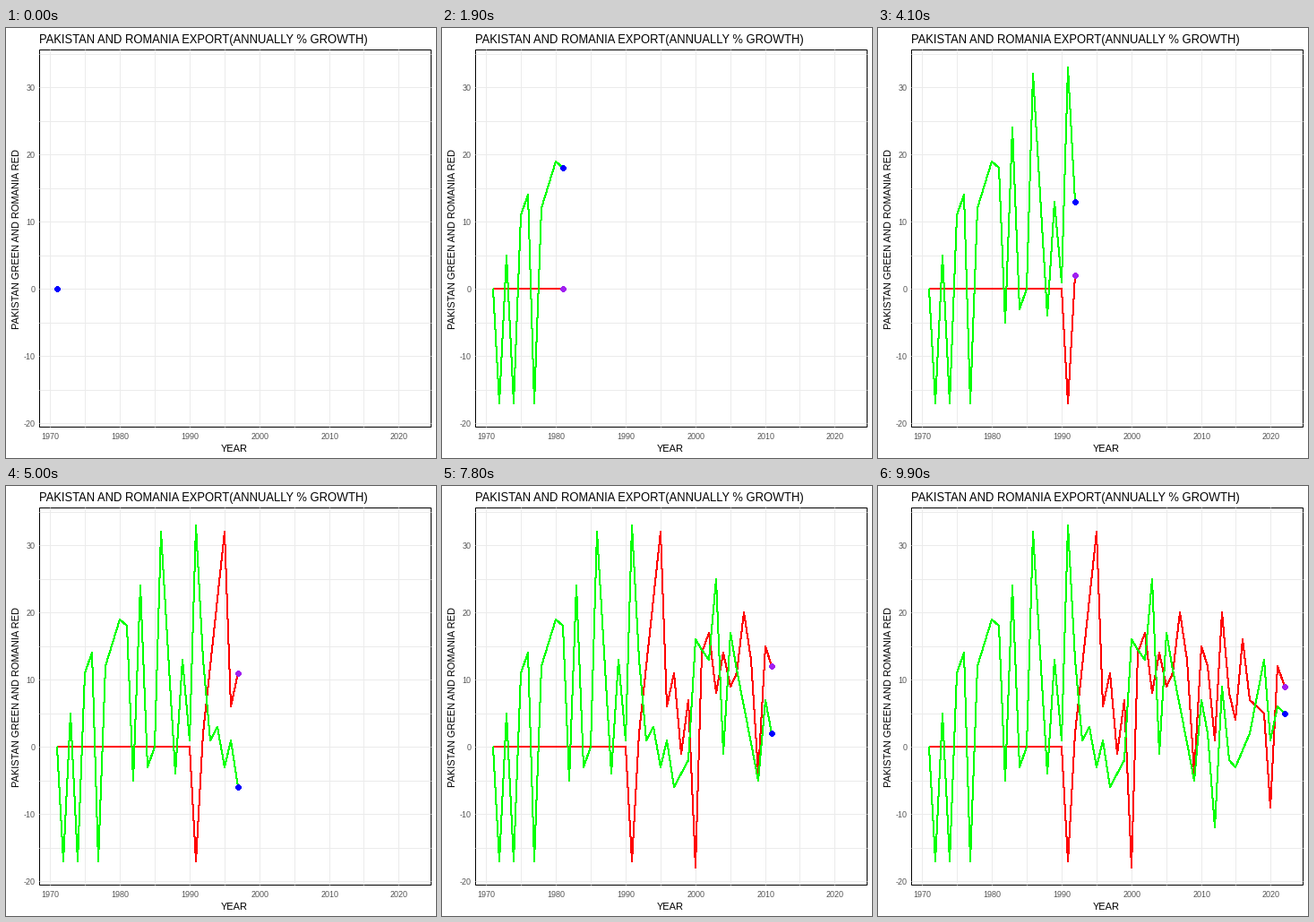
A matplotlib script for the animation above (10000 ms loop, 480 by 480 pixels).

```python
import numpy as np
import matplotlib.pyplot as plt
from matplotlib.animation import FuncAnimation
from matplotlib.patches import Circle, Rectangle

SIZE, DPI = 480, 72
FRAMES, INTERVAL = 100, 100
LEFT, RIGHT, TOP, BOTTOM = 37, 474, 24, 445
GRID, TICK = "#EBEBEB", "#4D4D4D"

plt.rcParams["font.family"] = "Liberation Sans"
plt.rcParams["text.hinting"] = "native"

_ = np.nan  # a year that lies on the straight run between its neighbours
years = np.arange(1971, 2023)


def fill(points):
    """Complete a yearly series from its turning points."""
    points = np.array(points, float)
    known = ~np.isnan(points)
    return np.interp(years, years[known], points[known])


pakistan = fill([
    0, -17, 5, -17, 11, 14, -17, 12, _, 19,
    18, -5, 24, -3, 0, 32, _, -4, 13, 1,
    33, 13, 1, 3, -3, 1, -6, _, -2, 16,
    _, 13, 25, -1, 17, _, _, _, -5, 7,
    2, -12, 9, -2, -3, _, 2, _, 13, 1, 6, 5])
romania = fill([0] * 20 + [
    -17, 2, _, _, 32, 6, 11, -1, 7, -18,
    14, 17, 8, 14, 9, 11, 20, 13, -4, 15,
    12, 1, 20, 8, 4, 16, 7, _, 5, -9, 12, 9])

# Each year lands on its nearest frame; values are linear in between.
keys = np.rint((years - years[0]) * (FRAMES - 1) / (years[-1] - years[0]))


# Positions fall on whole pixels.
def px(year):
    return np.floor(49.28 + (year - 1970) * 7.793)


def py(value):
    return np.floor(291.7 - value * 7.495)


fig = plt.figure(figsize=(SIZE / DPI, SIZE / DPI), dpi=DPI, facecolor="white")
ax = fig.add_axes([0, 0, 1, 1])
ax.set_xlim(0, SIZE)
ax.set_ylim(SIZE, 0)
ax.axis("off")


def label(x, y, text, size, color="black", **kw):
    ax.text(x, y, text, fontsize=size, color=color, va="baseline", **kw)


def grid_line(xs, ys):
    ax.plot(xs, ys, color=GRID, lw=1, zorder=1, solid_capstyle="butt")


ax.add_patch(Rectangle((LEFT, TOP), RIGHT - LEFT, BOTTOM - TOP,
                       fc="white", ec="black", lw=1, zorder=0))

for year in range(1970, 2021, 5):
    x = px(year)
    grid_line([x, x], [TOP, BOTTOM])
    if year % 10 == 0:
        label(x + .2, 459, str(year), 9, TICK, ha="center")

for value in range(-20, 36, 5):
    y = py(value)
    grid_line([LEFT, RIGHT], [y, y])
    if value % 10 == 0:
        label(32.5, y + 4, str(value), 9, TICK, ha="right")

label(37, 17, "PAKISTAN AND ROMANIA EXPORT(ANNUALLY % GROWTH)", 13)
label(254.8, 473, "YEAR", 11, ha="center")
label(15, 236, "PAKISTAN GREEN AND ROMANIA RED", 11, ha="center",
      rotation=90, rotation_mode="anchor")


def make_line(color, z):
    # Without antialiasing every touched pixel is filled: two pixels wide.
    return ax.plot([], [], color=color, lw=1, zorder=z, antialiased=False,
                   snap=False, solid_capstyle="butt",
                   solid_joinstyle="round")[0]


def make_dot(color, z):
    return ax.add_patch(Circle((0, 0), 2.9, color=color, lw=0, zorder=z,
                               antialiased=False))


series = [
    (romania, make_line("#FF0000", 2), make_dot("#A020F0", 4)),
    (pakistan, make_line("#00FF00", 3), make_dot("#0000FF", 5)),
]


def update(i):
    now = np.interp(i, keys, years)
    past = keys < i
    x = px(np.append(years[past], now))
    artists = []
    for values, line, dot in series:
        y = py(np.append(values[past], np.interp(now, years, values)))
        line.set_data(x, y)
        dot.center = x[-1] + .5, y[-1] + .5
        artists += [line, dot]
    return artists


anim = FuncAnimation(fig, update, frames=FRAMES, interval=INTERVAL,
                     repeat=True, repeat_delay=0)
plt.show()
```
